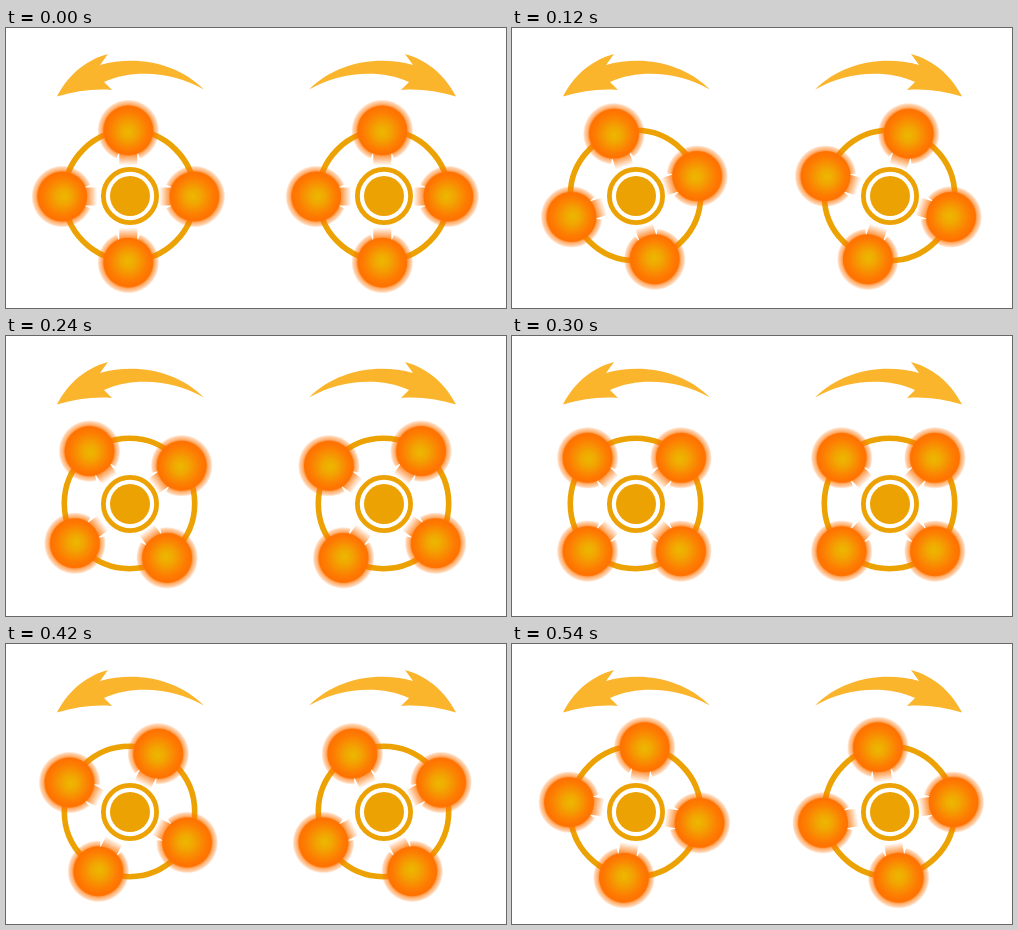
Recreate the animation shown at these times as an HTML page with a canvas. Size 500x280 px, loop 570 ms.

```html
<!DOCTYPE html>
<html lang="en">
<head>
<meta charset="utf-8">
<title>Opposite rotations</title>
<style>
  html, body { margin: 0; width: 100%; height: 100%; overflow: hidden; background: #fff; }
  canvas { display: block; }
</style>
</head>
<body>
<canvas id="stage" width="500" height="280"></canvas>
<script>
const ctx = document.getElementById('stage').getContext('2d');
const STEPS = 19, STEP_MS = 30, STEP_ANGLE = Math.PI / 40;
const ORBIT = 66, GOLD = '#eda204';
const arrow = new Path2D(`M51 68.5 C60 51 76 33 102 26 L94 37
  C131 27 171 35 198 61.5 C168 45 130 40 98 54 L106 62 C88 60.5 70 63 51 68.5 Z`);

function withStops(gradient, ...stops) {
  stops.forEach(([at, color]) => gradient.addColorStop(at, color));
  return gradient;
}

const orange = alpha => `rgba(255,114,0,${alpha})`;
const halo = withStops(ctx.createRadialGradient(0, 0, 24, 0, 0, 31),
  [0, orange(0.9)], [0.35, orange(0.55)], [0.75, orange(0.3)], [1, orange(0)]);
const tail = withStops(ctx.createLinearGradient(0, 23, 0, 35), [0, orange(0.85)], [1, orange(0)]);
const core = withStops(ctx.createRadialGradient(0, 2, 0, 0, 0, 25),
  [0, '#ecb800'], [0.3, '#f1a602'], [0.75, '#fd7d02'], [0.95, '#ff7200'], [1, orange(0.8)]);

function disc(x, y, r, fill) {
  ctx.fillStyle = fill;
  ctx.beginPath();
  ctx.arc(x, y, r, 0, 2 * Math.PI);
  ctx.fill();
}

function ring(x, y, r, width) {
  ctx.strokeStyle = GOLD;
  ctx.lineWidth = width;
  ctx.beginPath();
  ctx.arc(x, y, r, 0, 2 * Math.PI);
  ctx.stroke();
}

// The ball sits above the orbit centre, with its tail pointing down at it.
function ball(angle) {
  ctx.save();
  ctx.rotate(angle);
  ctx.translate(0, -ORBIT);

  ctx.fillStyle = halo;
  ctx.beginPath();
  ctx.moveTo(0, 0);
  ctx.arc(0, 0, 31, Math.PI / 2 + 0.4, Math.PI * 2.5 - 0.4);
  ctx.fill();

  ctx.fillStyle = tail;
  ctx.fillRect(-9, 20, 18, 15);
  disc(0, 0, 25, core);
  ctx.restore();
}

function wheel(x, angle) {
  ring(x + 123.5, 167.5, 65.2, 5.6);
  ctx.save();
  ctx.translate(x + 122.3, 168.5);
  for (let i = 0; i < 4; i++) ball(angle + i * Math.PI / 2);
  ctx.restore();
  ring(x + 124, 168, 26.6, 4.8);
  disc(x + 124, 168, 20, GOLD);
}

function draw(now) {
  const angle = Math.floor(now / STEP_MS) % STEPS * STEP_ANGLE;
  ctx.fillStyle = '#fff';
  ctx.fillRect(0, 0, 500, 280);
  wheel(0, -angle);
  wheel(254, angle);

  ctx.fillStyle = '#fbb52d';
  ctx.fill(arrow);
  ctx.save();
  ctx.translate(501, 0);
  ctx.scale(-1, 1);
  ctx.fill(arrow);
  ctx.restore();
}

const start = performance.now();
function tick() {
  draw(performance.now() - start);
  requestAnimationFrame(tick);
}
tick();
</script>
</body>
</html>
```
